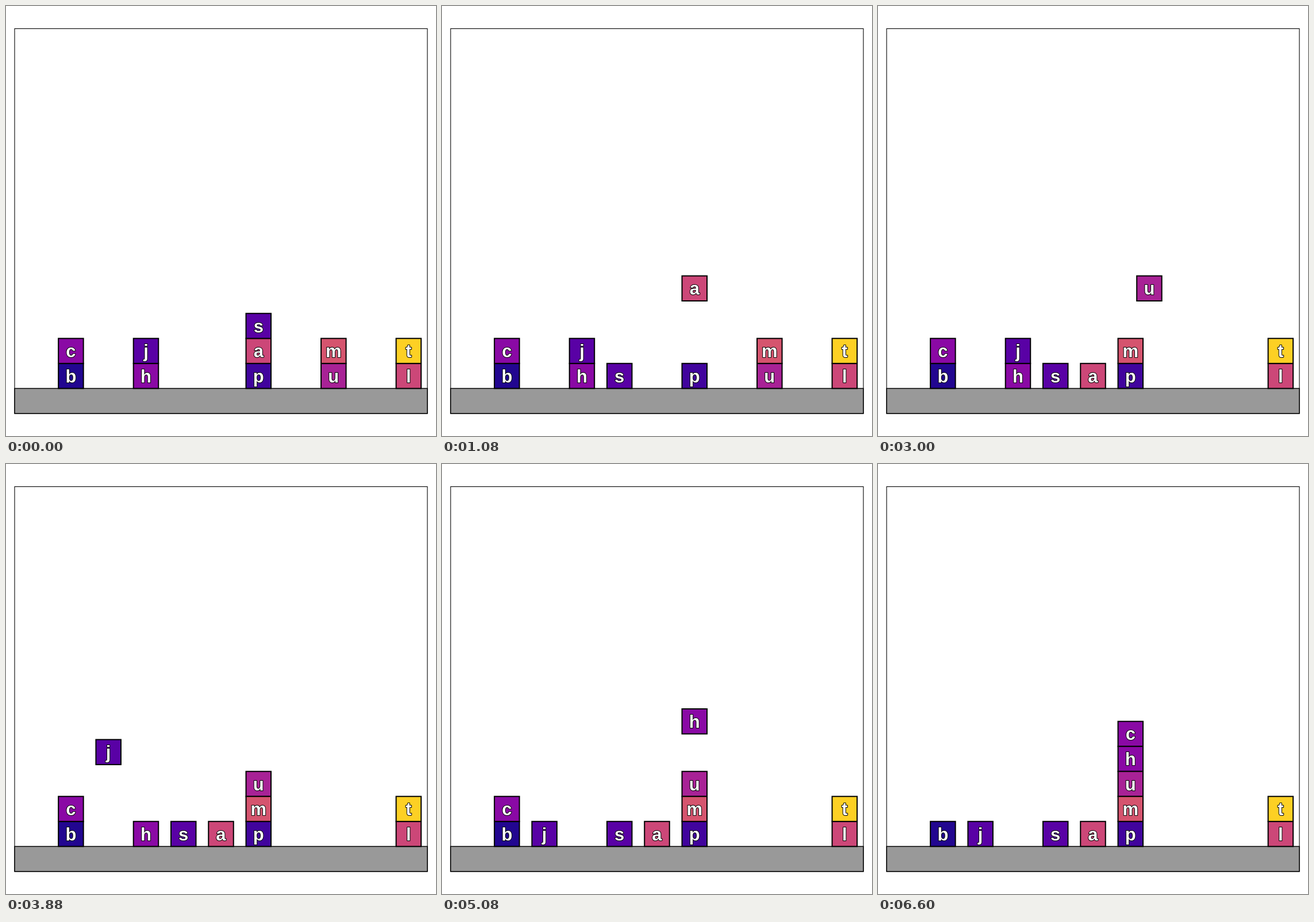
Write an HTML page that moves like this. It is 748 px wide and 748 px high and loops after 6640 ms.

```html
<!DOCTYPE html>
<html lang="en">
<head>
<meta charset="utf-8">
<title>Stacking blocks</title>
<style>
  html, body { margin: 0; width: 100%; height: 100%; overflow: hidden; background: #fff; }
  svg { display: block; width: 100%; height: 100%; }
  .block rect { stroke: #000; stroke-width: 2; }
  .block text {
    font: bold 31px "Liberation Sans", Arial, sans-serif;
    text-anchor: middle;
    fill: #fff;
    stroke: #000;
    stroke-width: 2;
    stroke-linejoin: round;
    paint-order: stroke;
  }
</style>
</head>
<body>
<svg id="stage" viewBox="0 0 748 748">
  <rect x="15" y="39.4" width="718" height="669.4" fill="#fff" stroke="#000" stroke-width="1.1"/>
  <rect x="15" y="665.3" width="718" height="43.5" fill="#999" stroke="#000" stroke-width="1.5"/>
</svg>
<script>
const UNIT = 718 / 16.5;
const LEFT = 15, FLOOR = 665.3;
const STEP_MS = 40, STEPS_PER_UNIT = 2.5;

const COLORS = {
  b: "#220690", c: "#8a09a5", j: "#5901a5", h: "#8a09a5", s: "#5901a5", a: "#cc4778",
  p: "#41049d", m: "#d5546e", u: "#a82296", t: "#fdd024", l: "#cc4778"
};
// Stacks by column, bottom block first.
const START = { 1: "bc", 3: "hj", 6: "pas", 8: "um", 10: "lt" };
const MOVES = [["s", 4], ["a", 5], ["m", 6], ["u", 6], ["j", 2], ["h", 6], ["c", 6]];

const colX = col => 1.5 * col + 0.25;
const clone = pose => ({ ...pose });

function startPose() {
  const pose = {};
  for (const [col, letters] of Object.entries(START))
    [...letters].forEach((id, row) => pose[id] = { x: colX(+col), row });
  return pose;
}

// Each move lifts a block clear of the tallest stack, carries it across, then lowers it.
function planLegs() {
  const pose = startPose();
  const legs = [];
  let step = 0;
  for (const [id, col] of MOVES) {
    const others = Object.keys(pose).filter(key => key !== id).map(key => pose[key]);
    const lift = Math.max(...others.map(o => o.row)) + 2.5;
    const x = colX(col);
    const row = others.filter(o => o.x === x).length;
    for (const to of [{ x: pose[id].x, row: lift }, { x, row: lift }, { x, row }]) {
      const from = pose[id];
      const distance = Math.abs(to.x - from.x) + Math.abs(to.row - from.row);
      const steps = Math.round(distance * STEPS_PER_UNIT);
      legs.push({ id, from, to, start: step, steps });
      pose[id] = to;
      step += steps;
    }
  }
  return { legs, total: step + 1 };
}

const svg = document.getElementById("stage");
function add(parent, name, attrs) {
  const node = document.createElementNS("http://www.w3.org/2000/svg", name);
  for (const key in attrs) node.setAttribute(key, attrs[key]);
  return parent.appendChild(node);
}

const initial = startPose();
const { legs, total } = planLegs();
const nodes = {};
for (const id in initial) {
  const group = nodes[id] = add(svg, "g", { class: "block" });
  add(group, "rect", { y: -UNIT, width: UNIT, height: UNIT, fill: COLORS[id] });
  add(group, "text", { x: UNIT / 2, y: 11 - UNIT / 2 }).textContent = id;
}

function draw(step) {
  const pose = clone(initial);
  for (const { id, from, to, start, steps } of legs) {
    if (step <= start) break;
    const k = Math.min(1, (step - start) / steps);
    pose[id] = { x: from.x + (to.x - from.x) * k, row: from.row + (to.row - from.row) * k };
  }
  for (const id in pose) {
    const { x, row } = pose[id];
    nodes[id].setAttribute("transform", `translate(${LEFT + x * UNIT} ${FLOOR - row * UNIT})`);
  }
}

function tick() {
  draw(Math.floor(performance.now() / STEP_MS) % total);
  requestAnimationFrame(tick);
}
draw(0);
tick();
</script>
</body>
</html>
```
